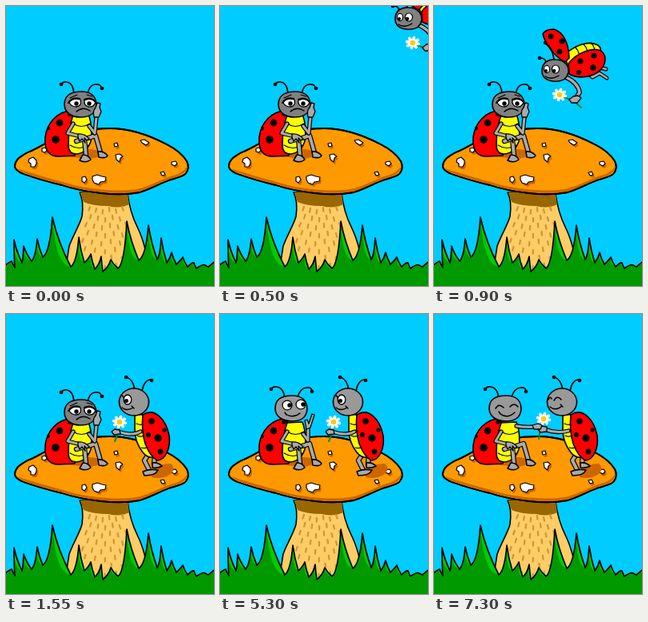
An HTML page for the animation above (8 s loop, 260 by 350 pixels).

```html
<!DOCTYPE html>
<html lang="en">
<head>
<meta charset="utf-8">
<title>Ladybugs on a mushroom</title>
<style>
  html, body { margin: 0; width: 100%; height: 100%; overflow: hidden; background: #0cf; }
  svg { display: block; width: 260px; height: 350px; }
  path, circle, ellipse { stroke-linecap: round; stroke-linejoin: round; }
</style>
</head>
<body>
<svg id="stage" viewBox="0 0 260 350"></svg>
<script>
const RED = '#f00', GRAY = '#999', DARK = '#808080', SKIN = '#aaa', YELLOW = '#ff0', ORANGE = '#f90', SHADE = '#c60';

// drawing helpers
const shape = (d, fill, w = 1.6, ink = '#000') =>
  `<path d="${d}" fill="${fill}" stroke="${ink}" stroke-width="${w}"/>`;
const line = (d, w = 1.5, ink = '#000') => shape(d, 'none', w, ink);
const flat = (d, fill) => `<path d="${d}" fill="${fill}"/>`;
const oval = (x, y, rx, ry, fill, w = 1.6) =>
  `<ellipse cx="${x}" cy="${y}" rx="${rx}" ry="${ry}" fill="${fill}" stroke="#000" stroke-width="${w}"/>`;
const dot = (x, y, r, fill = '#000') => `<circle cx="${x}" cy="${y}" r="${r}" fill="${fill}"/>`;
const limb = (d, w = 4) => line(d, w + 2.4) + line(d, w, SKIN);
const group = (id, body) => `<g id="${id}">${body}</g>`;
const feeler = (d, x, y) => line(d, 1.7) + dot(x, y, 2.3);

function flower(x, y, stem) {
  let petals = '';
  for (let i = 0; i < 8; i++) {
    const a = i * Math.PI / 4 + 0.2;
    petals += `M${x} ${y}l${7.5 * Math.cos(a)} ${6.5 * Math.sin(a)}`;
  }
  return line(stem, 2, '#083') + line(petals, 3.8, '#fff') + dot(x, y, 3.3, '#fc0');
}

function mushroom() {
  const cap = 'M11 201C11 192 18 188 27 183C38 179 46 173 57 168C80 158 105 153 130 153C158 153 182 163 201 173C213 179 221 186 226 194Q230 202 225 209C220 215 209 215 201 219C190 223 180 229 167 233C151 236 137 236 119 234C101 232 85 229 70 224C53 220 36 215 22 210Q12 206 11 201Z';
  let s = shape('M92 233C96 241 97 249 95 263C92 274 84 286 79 300L72 345H180C178 316 172 292 164 276C158 264 154 251 152 234Z', '#fc6');
  s += flat('M93 233H152L154 248Q142 254 128 250Q108 250 97 245Z', '#960');
  let dashes = '';
  for (let row = 0; row < 8; row++) {
    const y = 251 + row * 10, half = 24 + row * 2.5;
    for (let k = 0; k < 6; k++) {
      const u = (k + 0.5 + (row % 2) * 0.4) / 6 * 2 - 1;
      if (u > 0.93) continue;
      dashes += `M${125 + u * half} ${y + k * 7 % 5}l${u * 2} 4.5`;
    }
  }
  s += line(dashes, 2.3, '#c93');
  s += shape(cap, ORANGE, 1.8);
  s += flat('M14 203C40 212 62 217 85 224C112 230 145 233 168 228C182 224 194 217 205 213Q220 210 226 201Q227 209 212 214C198 219 184 228 167 232C137 237 101 232 70 223Q19 210 14 203Z', SHADE);
  s += line(cap, 1.8);
  const chips = [
    'M45 178l4 -1l2 3l-2 3l-4 -1z', 'M29 191l5 -2l4 4l0 4l-2 4l-5 0l0 -4l-3 -2z',
    'M95 214l4 -1l2 4l-3 4l-3 -2z', 'M108 213l6 -2l6 2l5 1l-1 5l-6 1l-2 3l-6 -2l-2 -4z',
    'M137 186l5 -1l4 3l-3 2l-1 5l-4 -3z', 'M135 172l4 -1l1 4l-4 1z',
    'M168 168l5 -1l6 4l-4 3l-5 -3z', 'M193 208l4 -1l2 4l-4 1z', 'M207 195l5 -1l2 3l-3 3l-4 -2z'
  ];
  return s + chips.map(d => `<g transform="translate(2 3)">${flat(d, SHADE)}</g>` + shape(d, '#fff', 1.2)).join('');
}

function grass() {
  // tip x, tip y, next valley x, valley y
  const blades = [
    [7, 319, 11, 327], [10, 292, 20, 321], [22, 300, 32, 319], [39, 291, 46, 314],
    [58, 264, 81, 326], [91, 289, 98, 321], [106, 310, 111, 329],
    [119, 313, 121, 332], [131, 317, 140, 328], [151, 269, 166, 318],
    [178, 274, 189, 317], [194, 290, 201, 321], [207, 308, 213, 323], [221, 314, 227, 326],
    [235, 321, 238, 328], [249, 324, 253, 326], [262, 319, 264, 350]
  ];
  let d = 'M-4 354V326', light = '', x0 = -4, y0 = 326;
  for (const [x, y, vx, vy] of blades) {
    const mx = x + (vx - x) * 0.3, my = (y + vy) / 2;
    d += `Q${x0 + (x - x0) * 0.75} ${y0 - 6} ${x} ${y}Q${mx} ${my} ${vx} ${vy}`;
    light += `M${x} ${y}Q${mx} ${my} ${vx} ${vy}Q${mx - 3} ${vy - 2} ${x} ${y}Z`;
    x0 = vx; y0 = vy;
  }
  d += 'V354Z';
  return flat(d, '#090') + flat(light, '#0c0') + line(d, 1.7);
}

function sitterBody() {
  return flat('M62 187Q85 174 118 181Q126 188 104 191Z', SHADE) +
    shape('M82 131C65 131 51 146 49 164C48 180 53 188 66 188L86 187L91 148Z', RED) +
    dot(67, 146, 4.4) + dot(62, 167, 4.8) + dot(80, 135, 2.8) + dot(53, 153, 2) +
    shape('M84 136C79 150 78 163 78 174Q78 185 88 185Q101 184 106 169C108 154 106 143 103 135Z', YELLOW) +
    line('M84 147Q94 154 105 147M80 174Q91 181 103 174', 1.2);
}

function sitterLegs() {
  return limb('M103 165L112 162L118 183') + shape('M115 182Q122 181 127 187Q125 191 116 189Z', SKIN) +
    limb('M88 169L98 166L100 187') + shape('M96 186Q103 186 106 192Q100 197 92 193Z', SKIN) +
    limb('M84 147L77 159L93 163', 3) +
    shape('M90 160Q98 159 104 166L101 168L98 165L99 171L95 166L92 169L90 164Z', SKIN, 1.3);
}

const cheekArm = limb('M104 150L111 159L113 139', 3) +
  shape('M110 139Q108 131 112 127L114 121L118 122L117 127L119 132L116 139Z', SKIN, 1.3);
const looseArm = limb('M104 150L110 158L110 143', 3) +
  shape('M108 144L106 133L109 132L111 137L115 125L118 126L113 142Z', SKIN, 1.3);
const reachArm = limb('M103 140Q114 142 126 141', 3) +
  shape('M123 139L130 137L135 139L133 144L125 144Z', SKIN, 1.3);

function lowHead(face) {
  return feeler('M85 110Q84 96 76 95Q71 94 69 98', 69, 98) + feeler('M102 110Q104 99 111 98Q118 97 119 102', 120, 103) +
    shape('M73 123C73 111 83 107 94 107C106 107 113 113 113 124C112 135 103 139 93 139C82 139 73 133 73 123Z', DARK) + face;
}

function highHead(face) {
  return feeler('M81 105Q79 92 71 91Q66 90 64 94', 64, 94) + feeler('M97 104Q100 93 108 92Q114 91 115 96', 115, 97) +
    shape('M69 118C69 106 78 102 90 102C102 102 109 108 109 119C108 130 100 134 90 134C78 134 69 128 69 118Z', GRAY) + face;
}

const sadFace = shape('M79 121Q83 114 93 117Q95 125 88 126Q82 126 79 121Z', '#fff', 1.3) +
  shape('M98 118Q106 114 112 120Q110 127 103 126Q97 124 98 118Z', '#fff', 1.3) +
  dot(88, 122, 2.7) + dot(104, 122, 2.7) +
  line('M78 121Q83 113 92 116M98 117Q106 113 112 120', 2) +
  line('M80 115L89 111M101 111L108 113', 1.2) + line('M88 132Q96 125 105 131', 1.5);
const startledFace = oval(86, 121, 6.3, 5.5, '#fff', 1.3) + oval(105, 120, 6.3, 5.7, '#fff', 1.3) +
  dot(89, 121, 2.6) + dot(108, 120, 2.6) + line('M80 113Q85 109 91 112M98 111Q104 108 108 112', 1.4) +
  oval(97, 132, 3, 1.9, '#333', 1.2);
const happyFace = oval(84, 114, 6, 5.8, '#fff', 1.3) + oval(101, 113, 6, 5.8, '#fff', 1.3) +
  dot(87, 114, 2.7) + dot(104, 113, 2.7) + line('M82 125Q91 131 100 124M81 123l2 3', 1.4);
const blissFace = line('M77 118Q81 111 87 117M95 116Q100 110 105 116', 1.6) +
  line('M82 124Q91 132 101 123M81 122l2 3', 1.4);

function suitorBody() {
  return flat('M182 197Q188 187 206 187Q213 193 206 200Q196 207 182 204Z', SHADE) +
    limb('M186 177L185 187') + shape('M183 186Q190 185 195 190Q191 193 183 192Z', SKIN) +
    limb('M179 174L173 183L179 195') + shape('M171 197Q179 193 190 195Q187 202 173 202Z', SKIN) +
    shape('M161 127Q172 123 177 131L188 179Q177 181 171 173Q161 160 161 145Z', YELLOW) +
    line('M163 137Q169 140 174 136M164 152Q170 155 175 150M169 167Q176 169 181 164', 1.2) +
    shape('M171 126C186 116 200 132 204 152C206 168 199 183 189 183Q180 178 174 162Q169 145 171 126Z', RED) +
    dot(182, 134, 3.8) + dot(190, 155, 4.6) + dot(178, 151, 3) + dot(193, 172, 3.4) + dot(198, 145, 2.6);
}

function suitorHead(face) {
  return feeler('M161 95Q159 82 151 79', 150, 79) + feeler('M170 96Q173 82 181 82', 182, 83) +
    oval(160, 110, 18.5, 17, GRAY) + face;
}

const suitorOpen = oval(152, 107, 4.8, 6, '#fff', 1.3) + dot(150.5, 108.5, 2.5) +
  line('M143 104Q145 99 147 105', 1.3) + line('M145 117Q151 122 159 117M157 115l3 3', 1.4);
const suitorShut = line('M150 108Q154 101 159 107M143 107Q145 102 147 106', 1.6) +
  line('M145 116Q152 122 160 115M158 113l3 3', 1.4);

const offerArm = flower(142, 135, 'M142 138Q140 151 136 159') +
  limb('M168 147Q158 153 140 147', 3) + shape('M142 145L136 144L132 147L135 151L143 150Z', SKIN, 1.3);
const giveArm = flower(137, 131, 'M135 136Q132 146 131 156') +
  limb('M168 146Q153 150 138 144', 3) + shape('M141 141L134 140L130 144L133 148L141 147Z', SKIN, 1.3);

function flyer() {
  return limb('M235 44L244 52L250 45L257 47', 2.6) + limb('M232 49L240 57L249 52L258 58', 2.6) +
    shape('M205 29C217 18 235 10 247 17C255 23 247 33 233 39L211 49Z', YELLOW) +
    line('M219 20Q225 26 224 38M229 16Q236 22 234 36M238 14Q245 20 242 31', 1.2) +
    shape('M206 38C192 31 181 15 178 3Q181 -3 192 -3C204 1 210 13 211 33Z', RED) +
    dot(188, 6, 3.5) + dot(202, 12, 3.5) + dot(199, 25, 3.5) +
    shape('M210 40C220 27 239 19 251 24C259 31 257 42 248 50C236 58 221 59 211 53Z', RED) +
    dot(225, 37, 3.6) + dot(242, 30, 3.6) + dot(241, 45, 3.8) + dot(223, 51, 3) +
    flower(199, 79, 'M204 82Q216 85 226 95') +
    limb('M207 57Q222 64 224 76L218 85', 3.5) + shape('M222 80L216 81L211 85L214 89L221 89L226 83Z', SKIN, 1.3) +
    feeler('M182 40Q182 33 175 33', 174, 33) + feeler('M192 35Q190 19 181 15', 181, 14) +
    shape('M177 49C177 38 186 34 194 35C205 35 211 43 210 51C208 61 199 63 191 62C182 61 177 57 177 49Z', DARK) +
    oval(183, 47, 3.6, 4.6, '#fff', 1.2) + oval(194, 47, 4.6, 5, '#fff', 1.2) +
    dot(182, 49, 2) + dot(192, 49, 2.3) + line('M181 56Q188 61 198 55', 1.4);
}

const heads = {
  sad: lowHead(sadFace) + cheekArm,
  startled: lowHead(startledFace) + cheekArm,
  happy: highHead(happyFace) + looseArm,
  bliss: highHead(blissFace) + reachArm
};
const suitors = {
  offer: suitorBody() + suitorHead(suitorOpen) + offerArm,
  give: suitorBody() + suitorHead(suitorShut) + giveArm
};
const groups = set => Object.entries(set).map(([id, body]) => group(id, body)).join('');

document.getElementById('stage').innerHTML =
  '<rect width="260" height="350" fill="#0cf"/>' + mushroom() + grass() +
  sitterBody() + sitterLegs() + groups(suitors) + groups(heads) + group('flyer', flyer());

// start time, sitter's mood, suitor's pose, flight offset
const steps = [
  [0, 'sad'],
  [500, 'sad', 'flyer', 42, -33],
  [650, 'sad', 'flyer', 0, 0],
  [900, 'sad', 'flyer', -42, 32],
  [1550, 'sad', 'offer'],
  [3550, 'startled', 'offer'],
  [5300, 'happy', 'offer'],
  [7300, 'bliss', 'give']
];
const LOOP = 8000;
const parts = [...Object.keys(heads), ...Object.keys(suitors), 'flyer']
  .map(id => document.getElementById(id));
const flyerPart = parts[parts.length - 1];
const start = performance.now();

function draw() {
  const t = Math.max(0, performance.now() - start) % LOOP;
  const [, mood, pose, dx = 0, dy = 0] = steps.filter(s => s[0] <= t).pop();
  for (const part of parts)
    part.setAttribute('display', part.id === mood || part.id === pose ? 'inline' : 'none');
  flyerPart.setAttribute('transform', `translate(${dx} ${dy})`);
  requestAnimationFrame(draw);
}
draw();
</script>
</body>
</html>
```
